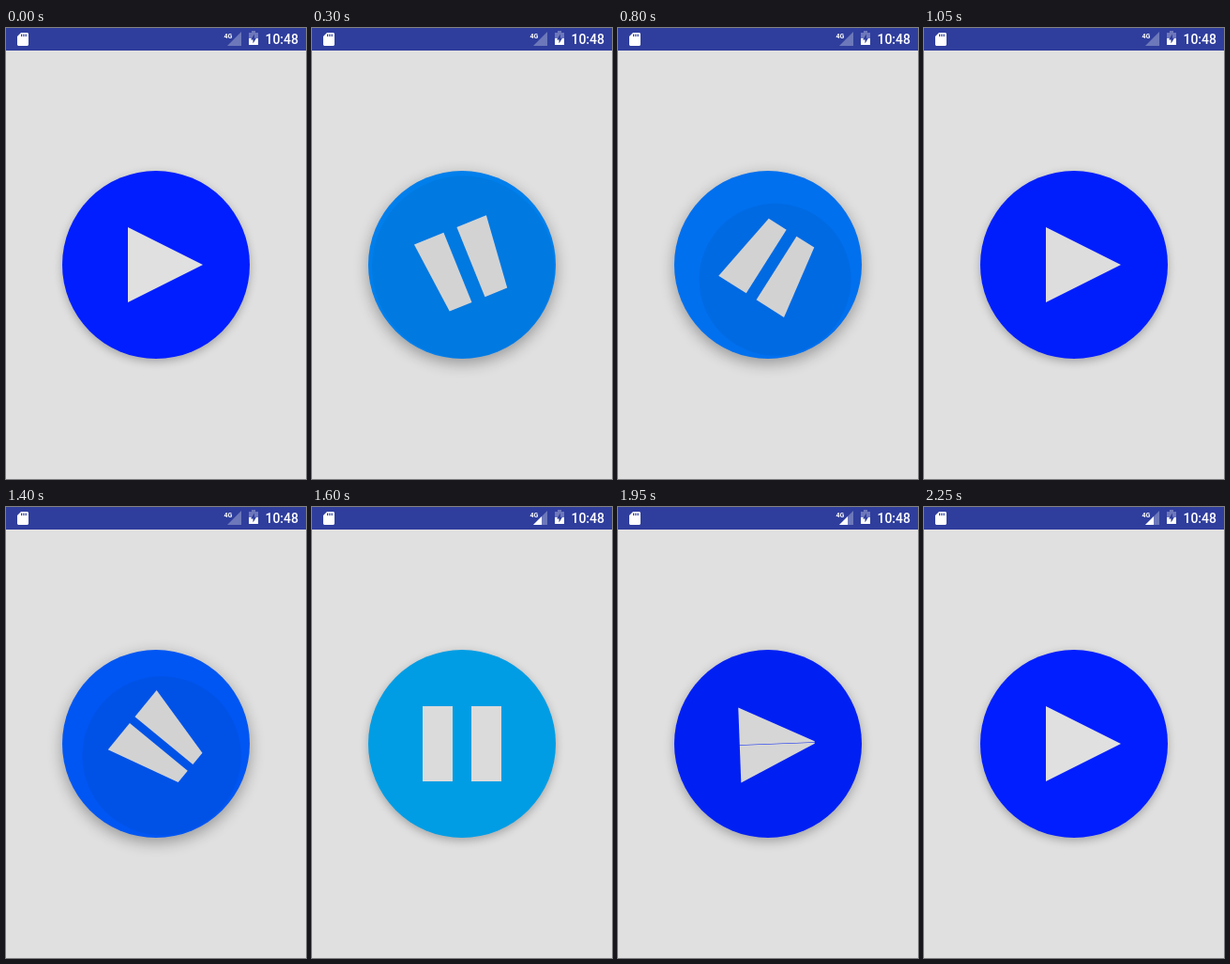
Animation of 320x480 px, one loop 2.65 s. Source, as an HTML page with a canvas:

```html
<!DOCTYPE html>
<html>
<head>
<meta charset="utf-8">
<title>Play / pause</title>
<style>
html, body { margin: 0; width: 100%; height: 100%; overflow: hidden; background: #e0e0e0; }
canvas { display: block; width: 320px; height: 480px; }
</style>
</head>
<body>
<canvas id="stage" width="320" height="480"></canvas>
<script>
const ctx = document.getElementById('stage').getContext('2d');
const LOOP = 2650, LAST = 2250, STEP = 50;
const CX = 160, CY = 252, R = 100;
const PLAY = [0, 30, 255], PAUSE = [0, 160, 234];
const LIGHT = '#e0e0e0', BAR = '#2f3e9d';
const BAR_H = 80, BAR_W = 32, GAP = 20;
const CLICKS = [199, 760, 1350, 1781];
const PRESS = 90, MORPH = 200, FADE = 333;
const TOUCH = { x: 200, y: 335 };
const SIGNAL_AT = 1500;

const clamp = v => Math.max(0, Math.min(1, v));
const lerp = (a, b, k) => a + (b - a) * k;
const easeOut = k => 1 - (1 - k) ** 2;

function poly(points, color) {
  ctx.beginPath();
  points.forEach(([x, y]) => ctx.lineTo(x, y));
  ctx.closePath();
  ctx.fillStyle = color;
  ctx.fill();
}

function disc(x, y, r, color) {
  ctx.beginPath();
  ctx.arc(x, y, r, 0, Math.PI * 2);
  ctx.fillStyle = color;
  ctx.fill();
}

// play: 1 is the triangle, 0 the two bars
function pose(t) {
  let play = 1, angle = 90;
  CLICKS.forEach((at, i) => {
    if (t < at) return;
    const k = easeOut(clamp((t - at) / MORPH));
    const toPause = i % 2 === 0;
    play = toPause ? 1 - k : k;
    angle = (toPause ? 90 : 0) + 90 * k;
  });
  return { play, angle };
}

function lift(t) {
  return Math.max(...CLICKS.map(at =>
    Math.min(clamp((t - at + PRESS) / 100), clamp((at + 200 - t) / 100))));
}

function drawButton(t, play) {
  const z = lift(t);
  const rgb = PLAY.map((c, i) => Math.round(lerp(PAUSE[i], c, play)));
  ctx.save();
  ctx.shadowColor = `rgba(0,0,0,${lerp(0.27, 0.33, z)})`;
  ctx.shadowBlur = lerp(10, 16, z);
  ctx.shadowOffsetY = lerp(3, 5, z);
  disc(CX, CY, R, `rgb(${rgb})`);
  ctx.restore();
}

function drawIcon({ play, angle }) {
  const gap = lerp(GAP, 0, play);
  const w = lerp(BAR_W, BAR_H / 2, play);
  const inset = lerp(0, w, play);
  const full = 2 * w + gap;
  ctx.save();
  ctx.translate(CX + BAR_H / 8 * play, CY);
  ctx.rotate(angle * Math.PI / 180);
  ctx.translate(-full / 2, BAR_H / 2);
  poly([[0, 0], [inset, -BAR_H], [w, -BAR_H], [w, 0]], LIGHT);
  poly([[w + gap, 0], [w + gap, -BAR_H], [full - inset, -BAR_H], [full, 0]], LIGHT);
  ctx.restore();
}

function drawRipples(t) {
  ctx.save();
  ctx.beginPath();
  ctx.arc(CX, CY, R, 0, Math.PI * 2);
  ctx.clip();
  for (const at of CLICKS) {
    const age = t - at + PRESS;
    if (age <= 0 || t > at + FADE) continue;
    const fade = 1 - clamp((t - at) / FADE);
    const late = Math.min(1, fade * 1.3);
    const grow = easeOut(clamp(age / 230));
    disc(CX, CY, R, `rgba(0,0,0,${0.06 * clamp(age / 600) * fade})`);
    disc(lerp(TOUCH.x, CX, grow), lerp(TOUCH.y, CY, grow), R * grow,
      `rgba(0,0,0,${0.05 * clamp(age / 120) * late})`);
  }
  ctx.restore();
}

function drawStatus(t) {
  const dim = 'rgba(255,255,255,0.3)';
  ctx.fillStyle = BAR;
  ctx.fillRect(0, 0, 320, 24);

  // memory card
  poly([[16, 5], [23, 5], [24, 6], [24, 18], [23, 19], [13, 19], [12, 18], [12, 9]], '#fff');
  ctx.fillStyle = BAR;
  for (let x = 16; x < 22; x += 2.3) ctx.fillRect(x, 6.5, 1.2, 2.6);

  // signal
  poly([[251, 4], [251, 19], [236, 19]], dim);
  if (t >= SIGNAL_AT) poly([[245, 10], [245, 19], [236, 19]], '#fff');
  ctx.fillStyle = '#fff';
  ctx.textAlign = 'left';
  ctx.font = 'bold 7px Roboto, sans-serif';
  ctx.fillText('4G', 232.5, 11, 9);

  // battery
  ctx.fillStyle = dim;
  ctx.fillRect(262, 3, 4, 2);
  ctx.fillRect(259, 5, 10, 6);
  ctx.fillStyle = '#fff';
  ctx.fillRect(259, 11, 10, 7);
  poly([[265, 6.5], [261, 12.5], [263.5, 12.5], [263.5, 16.5], [267, 10.8], [265, 10.8]], BAR);

  ctx.fillStyle = '#fff';
  ctx.textAlign = 'right';
  ctx.font = '500 14px Roboto, sans-serif';
  ctx.fillText('10:48', 312, 17);
}

function draw(now) {
  const t = Math.min(LAST, Math.floor((now % LOOP) / STEP) * STEP);
  const p = pose(t);
  ctx.fillStyle = LIGHT;
  ctx.fillRect(0, 0, 320, 480);
  drawStatus(t);
  drawButton(t, p.play);
  drawIcon(p);
  drawRipples(t);
}

const start = performance.now();
function tick() {
  draw(performance.now() - start);
  requestAnimationFrame(tick);
}
tick();
</script>
</body>
</html>
```
